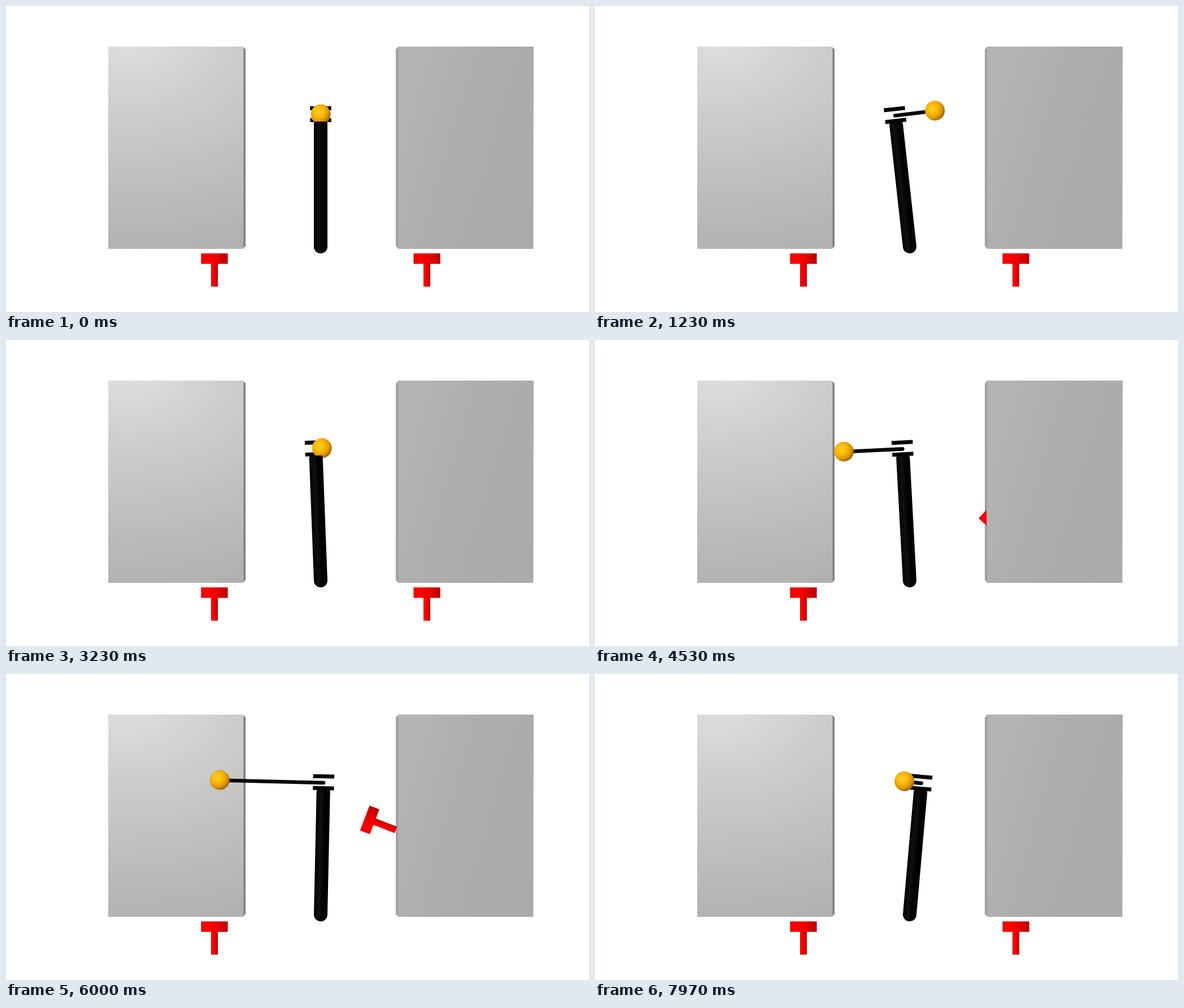
Animation of 1032 by 543 pixels, one loop 8 s. Source, as an HTML page:

```html
<!DOCTYPE html>
<html lang="en">
<head>
<meta charset="utf-8">
<title>Balancing arm</title>
<style>
  html, body { margin: 0; width: 100%; height: 100%; overflow: hidden; background: #fff; }
  svg { display: block; width: 1032px; height: 543px; }
</style>
</head>
<body>
<svg viewBox="0 0 1032 543">
  <defs>
    <radialGradient id="wallL" gradientUnits="userSpaceOnUse" r="390"
        gradientTransform="translate(215 58) scale(1.45 1)" cx="0" cy="0">
      <stop offset="0" stop-color="#dfdfdf"/>
      <stop offset=".3" stop-color="#cfcfcf"/>
      <stop offset=".6" stop-color="#c0c1c1"/>
      <stop offset="1" stop-color="#b1b1b1"/>
    </radialGradient>
    <linearGradient id="wallR" gradientUnits="userSpaceOnUse" x1="695" y1="180" x2="934" y2="250">
      <stop offset="0" stop-color="#b4b4b4"/>
      <stop offset=".6" stop-color="#acacac"/>
      <stop offset="1" stop-color="#aaa"/>
    </linearGradient>
    <linearGradient id="red">
      <stop offset="0" stop-color="#ee0000"/>
      <stop offset=".25" stop-color="#ff0000"/>
      <stop offset=".6" stop-color="#e80000"/>
      <stop offset="1" stop-color="#b80000"/>
    </linearGradient>
    <linearGradient id="redFlip" href="#red" x1="1" x2="0"/>
    <linearGradient id="black">
      <stop offset="0" stop-color="#000"/>
      <stop offset=".35" stop-color="#111"/>
      <stop offset=".6" stop-color="#030303"/>
      <stop offset="1" stop-color="#000"/>
    </linearGradient>
    <radialGradient id="gold" cx=".38" cy=".38" r=".66">
      <stop offset="0" stop-color="#ffd21c"/>
      <stop offset=".4" stop-color="#fcb90c"/>
      <stop offset=".75" stop-color="#dc9606"/>
      <stop offset="1" stop-color="#8f5e00"/>
    </radialGradient>
    <g id="hammer">
      <rect x="182" y="30" width="12" height="41"/>
      <rect x="164.4" y="12" width="47.3" height="18.6"/>
    </g>
  </defs>

  <path d="M419 72L424 77V426L419 431Z" fill="#7e7e7e"/>
  <path d="M695 72L690 77V426L695 431Z" fill="#a2a2a2"/>
  <use id="left" href="#hammer" fill="url(#redFlip)"/>
  <use id="right" href="#hammer" fill="url(#red)"/>
  <path d="M181 72H420.5V431H181Z" fill="url(#wallL)"/>
  <path d="M693 74L695 72V431L693 429Z" fill="#a2a2a2"/>
  <path d="M694.8 72H934L933.5 431H694.8Z" fill="url(#wallR)"/>

  <g id="arm">
    <rect x="-18.7" y="-249" width="37.4" height="7"/>
    <rect x="-18.7" y="-228" width="37.4" height="7"/>
    <line id="rod" x1="0" y1="-234" y2="-234.6" stroke="#050505" stroke-width="6.6" stroke-linecap="round"/>
    <circle id="ball" cy="-235" r="17.5" fill="url(#gold)"/>
    <path d="M-12 -218Q-12 -222 -8 -222H8Q12 -222 12 -218V0A12 12 0 0 1 -12 0Z" fill="url(#black)"/>
  </g>
</svg>
<script>
const LOOP = 8000, FPS = 30, PX = 557, PY = 427;
const HIT = 160, REST = 840; // ms after launch
const $ = id => document.getElementById(id);

// dir 1: the left hammer knocks the arm to the right
const KICKS = [
  { at: 20, dir: 1, power: 1 },
  { at: 3900, dir: -1, power: 1.07 },
  { at: 5580, dir: -1, power: .9 }
];

// Rises from 0 at `delay` to 1 after `rise` ms, then dies away
function pulse(t, delay, rise, sharp) {
  const x = Math.max(0, t - delay) / rise;
  return (x * Math.exp(1 - x)) ** sharp;
}

// The arm gives way, then leans against the blow and settles (degrees)
const lean = t => 5.76 * pulse(t, 150, 330, 6) - 6.85 * pulse(t, 500, 1000, 1.6);

// The ball darts off with the blow, then creeps home (px)
const dart = t => 170 * pulse(t, 150, 155, 1.3) + 71 * pulse(t, 220, 860, 1.5);

// Struck up to a right angle, then falling back under gravity
function swing(t) {
  if (t < 0 || t > REST) return 0;
  return 90 * (t < HIT ? (t / HIT) ** 2 : 1 - ((t - HIT) / (REST - HIT)) ** 2);
}

const total = (t, rule) =>
  KICKS.reduce((sum, k) => sum + k.dir * k.power * rule(t - k.at), 0);

const raise = (t, dir) =>
  KICKS.filter(k => k.dir === dir)
    .reduce((sum, k) => sum + Math.min(1, k.power) * swing(t - k.at), 0);

function draw(t) {
  const x = total(t, dart);
  const base = `translate(${PX} ${PY})`;
  $('arm').setAttribute('transform', `${base} rotate(${total(t, lean)})`);
  $('ball').setAttribute('cx', x);
  $('rod').setAttribute('x2', x);
  $('left').setAttribute('transform', `${base} scale(-1 1) rotate(${-raise(t, 1)})`);
  $('right').setAttribute('transform', `${base} rotate(${-raise(t, -1)})`);
}

const begin = performance.now();
function tick(now) {
  const t = Math.max(0, now - begin) % LOOP;
  const step = Math.floor((t + 3.4) * FPS / 1000);
  draw(Math.min(step, LOOP * FPS / 1000 - 1) * 1000 / FPS);
  requestAnimationFrame(tick);
}
draw(0);
requestAnimationFrame(tick);
</script>
</body>
</html>
```
